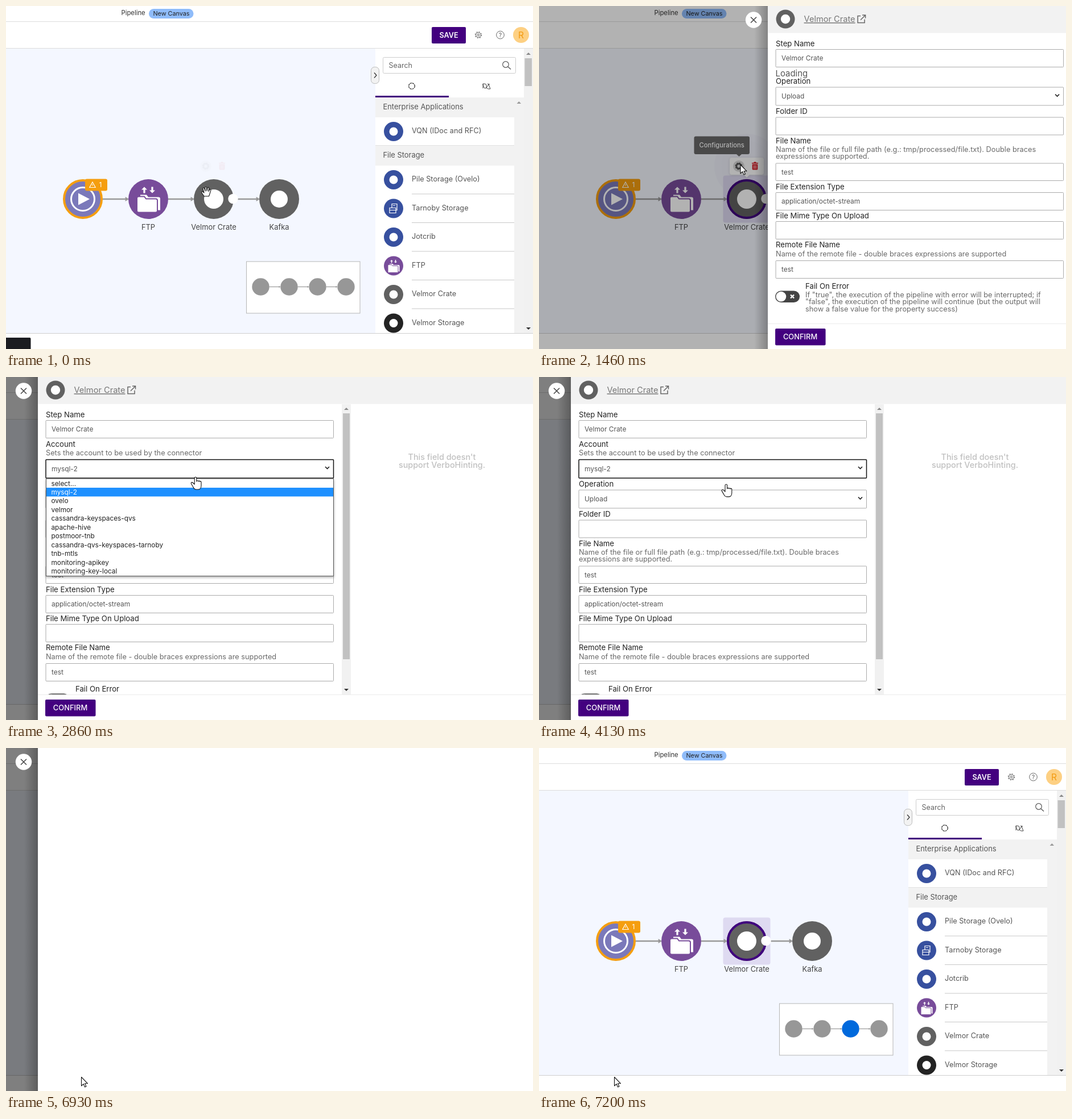
Animation, 926 px wide and 604 px high, one loop 7460 ms. Source, as an HTML page:

```html
<!DOCTYPE html>
<html lang="en">
<head>
<meta charset="utf-8">
<title>Pipeline canvas</title>
<style>
html, body { margin: 0; width: 100%; height: 100%; overflow: hidden; background: #fff; }
svg { display: block; }
text { font-family: Inter, "Open Sans", sans-serif; white-space: pre; }
</style>
</head>
<body>
<svg id="stage" width="926" height="604" viewBox="0 0 926 604"></svg>
<script>
const INDIGO = '#43007f', GREY = '#616161', BLUE = '#37509f', PURPLE = '#784c9a', ORANGE = '#f59e0f';

const text = (x, y, s, size = 13, fill = '#222', more = '') =>
  `<text x="${x}" y="${y}" font-size="${size}" fill="${fill}" ${more}>${s}</text>`;
const mid = (x, y, s, size, fill, more = '') => text(x, y, s, size, fill, `text-anchor="middle" ${more}`);
const rect = (x, y, w, h, fill, more = '') =>
  `<rect x="${x}" y="${y}" width="${w}" height="${h}" fill="${fill}" ${more}/>`;
const dot = (x, y, r, fill, more = '') => `<circle cx="${x}" cy="${y}" r="${r}" fill="${fill}" ${more}/>`;
const path = (d, fill = 'none', more = '') => `<path d="${d}" fill="${fill}" ${more}/>`;
const line = (d, color, w = 1, more = '') => path(d, 'none', `stroke="${color}" stroke-width="${w}" ${more}`);
const group = (id, body, more = '') => `<g id="${id}" ${more}>${body}</g>`;
const at = (x, y, s, body) => `<g transform="translate(${x} ${y}) scale(${s})">${body}</g>`;

const gear = (x, y, r, color, w, tooth) =>
  dot(x, y, r * .7, 'none', `stroke="${color}" stroke-width="${w}"`) +
  dot(x, y, r * .92, 'none', `stroke="${color}" stroke-width="${tooth}" stroke-dasharray="${r * .35} ${r * .3726}"`);

const folder = (x, y, s) => at(x, y, s,
  path('M-14-9h11l3 4h18q3 0 3 3v20h-35z', '#fff') +
  path('M-20-3q0-3 3-3h10l3 4h17q3 0 3 3v18q0 3-3 3h-30q-3 0-3-3z', '#fff', `stroke="${PURPLE}" stroke-width="2"`) +
  path('M-7-23l5 5h-3.4v6h-3.2v-6h-3.4zM7-12l5-5h-3.4v-6h-3.2v6h-3.4z', '#fff'));

const arrowLine = (x1, x2, y, head, w) =>
  line(`M${x1} ${y}H${x2 - 2}`, '#999', w) + path(`M${x2} ${y}l${-head * 1.6} ${-head}v${2 * head}z`, '#999');

function topBar() {
  return line('M0 27.5H926M0 74.5H926', '#dcdcdc') +
    text(202.5, 16, 'Pipeline', 11.3, '#333') +
    rect(251, 5, 78.5, 17, '#8fbcfa', 'rx="8.5"') + mid(290.5, 17, 'New Canvas', 10.8, '#222') +
    rect(748, 37, 60, 29, INDIGO, 'rx="2"') + mid(778, 55.5, 'SAVE', 12.6, '#fff', 'font-weight="600"') +
    gear(830, 51, 6, '#666', 1, 1.2) + dot(830, 51, 1.6, 'none', 'stroke="#666"') +
    dot(868.5, 51, 6.8, '#fff', 'stroke="#666"') + mid(868.5, 54.5, '?', 10, '#555') +
    dot(905, 51, 14, '#fdd083') + mid(905, 56.5, 'R', 15.5, '#f39a10');
}

function sidebar() {
  const items = [
    [220, 'VQN (IDoc and RFC)', BLUE], [305, 'Pile Storage (Ovelo)', BLUE], [355.5, 'Tarnoby Storage', BLUE],
    [406, 'Jotcrib', BLUE], [456.5, 'FTP', PURPLE], [507, 'Velmor Crate', GREY], [557.5, 'Velmor Storage', '#232323']];
  let s = rect(649, 75, 261, 501, '#fff') + rect(910, 75, 16, 501, '#f1f1f1') +
    rect(911.5, 92, 12.5, 49, '#c1c1c1') +
    path('M914 86l4-4 4 4z', '#888') + path('M914 566l4 4 4-4z', '#333') +
    rect(662.5, 90.5, 233, 28, '#fff', 'stroke="#ccc" rx="2"') + text(672.5, 109, 'Search', 12.5, '#666') +
    dot(878, 103, 5.3, 'none', 'stroke="#555" stroke-width="1.2"') + line('M882 107l5 4.5', '#555', 1.3) +
    dot(713, 141, 5.3, 'none', 'stroke="#333" stroke-width="1.3" stroke-dasharray="3.4 .8"') +
    line('M838 137h3q3 0 3 3v4q-2 2-4 0zM844 144l4-6 3 8h-4zM838 145v-8M846 137l4 1', '#444') +
    rect(649, 158, 129, 3, INDIGO) + rect(893, 161, 17, 415, '#f2f2f2') +
    path('M897.5 172l3.8-4 3.8 4z', '#999') +
    rect(649, 161, 244, 35, '#f2f2f2') + text(662.5, 182, 'Enterprise Applications', 12.9, '#555') +
    rect(649, 245.5, 244, 35.5, '#f2f2f2') + line('M649 245.5H893', '#e2e2e2') +
    text(662.5, 267, 'File Storage', 12.9, '#555');
  items.forEach(([y, name, color], i) => {
    s += dot(681, y + 1, 17, color) + text(713, y + 4.3, name, 12.7, '#555');
    if (name === 'FTP') s += folder(681, y + 2, .5);
    else if (i === 2) s += line(`M674 ${y + 9}v-9h11v9zM674 ${y + 4}h11M678 ${y}v-7h9v11h-2M680 ${y - 4}h4`, '#fff', 1.2);
    else s += dot(681, y + 1, 7.5, '#fff');
    if (i && i < 6) s += line(`M713 ${y + 26}H893`, '#c8c8c8');
  });
  return s + rect(641.5, 107.5, 14, 29, '#f2f2f2', 'rx="6" stroke="#bbb"') + line('M647 117.5l4 4.5-4 4.5', '#333', 1.3);
}

function flow() {
  const ring = (x, color) => dot(x, 340, 33, 'none', `stroke="${color}" stroke-width="4"`);
  const name = (x, s) => mid(x, 393.5, s, 12.9, '#444');
  return rect(0, 75, 649, 501, '#f4f7ff') +
    group('ripple', dot(365, 282, 57, '#eef0fa', 'opacity=".6"') + dot(365, 282, 45, '#eef1fb', 'opacity=".6"')) +
    group('selection', rect(323.5, 298.5, 83, 83, '#dedaf1', 'rx="4"')) +
    arrowLine(170, 216, 340, 4, 2.4) + arrowLine(285, 331, 340, 4, 2.4) + arrowLine(400, 446, 340, 4, 2.4) +
    dot(135, 340, 34, '#7b79ba') + ring(135, ORANGE) +
    dot(135, 340, 20.5, 'none', 'stroke="#fff" stroke-width="3"') + path('M127 329.5v21l20-10.5z', '#fff') +
    rect(139, 304.5, 39, 21, ORANGE, 'rx="3"') +
    line('M152 310l5.2 9.5h-10.4zM152 313.5v3', '#fff', 1.1) + mid(166, 319, '1', 12, '#fff') +
    dot(250, 340, 35, PURPLE) + folder(250, 341.5, 1) +
    dot(365, 340, 35, GREY) + group('ring', ring(365, '#40007f')) + dot(365, 340, 17, '#fff') + dot(399, 339.5, 8.7, '#fff') +
    dot(480, 340, 35, GREY) + dot(480, 340, 15, '#fff') +
    name(250, 'FTP') + name(365, 'Velmor Crate') + name(480, 'Kafka') +
    rect(422.5, 450, 199.5, 91, '#fff', 'stroke="#b5b5b5"') +
    [447.5, 497.5, 547.5, 597.5].map((x, i) =>
      (i ? arrowLine(x - 35, x - 15, 494.5, 1.8, 1.2) : '') + dot(x, 494.5, 15.2, '#979797', `id="mini${i}"`)).join('') +
    group('toolbar',
      path('M339 267h52q4 0 4 4v22q0 4-4 4h-21l-5 5-5-5h-21q-4 0-4-4v-22q0-4 4-4z', '#fff', 'style="filter:drop-shadow(0 1px 2px #0002)"') +
      dot(351, 282, 10, '#d9d9d9') + gear(351, 282, 6, '#555', 3, 2) +
      path('M374 276h3l1-1.5h3l1 1.5h3v1.6h-11zM374.7 278.5h9.6v8.5q0 1.5-1.5 1.5h-6.6q-1.5 0-1.5-1.5z', '#d8222c') +
      line('M377.5 280.5v6M379.5 280.5v6M381.5 280.5v6', '#fff', .7)) +
    group('tip', rect(272.5, 229.5, 97.5, 31.5, '#686868', 'rx="3"') + path('M347 261h9l-4.5 4z', '#686868') +
      mid(321.2, 249, 'Configurations', 11.2, '#fff', 'font-weight="500"'));
}

// Panel coordinates: x is measured from the panel's left edge.
const fields = [];
function field(y, value = '', select = false, h = 31) {
  fields.push([y, h]);
  return rect(14, y + .5, 505.5, h, '#fff', 'rx="1" class="field"') + text(24, y + h / 2 + 4.8, value, 11.9, '#555') +
    (select ? line(`M505 ${y + 13}l3.5 3.5 3.5-3.5`, '#222', 1.7) : '');
}
const label = (y, s, x = 14) => text(x, y, s, 13.15);
const hint = (y, s, x = 14) => text(x, y, s, 12.75, '#6a6a6a');

function menu(id, y, options) {
  const step = 15.45, h = options.length * step + 1.5;
  return group(id, rect(14.5, y, 505, h, '#fff', 'stroke="#555" style="filter:drop-shadow(0 2px 2px #0005)"') +
    rect(15, y + step + .5, 504, step, '#1e90ff') +
    options.map((s, i) => text(23.5, y + 12.5 + i * step, s, 11.8, i === 1 ? '#fff' : '#222')).join(''));
}

function panel() {
  const title = 'Velmor Crate';
  const form = label(70.7, 'Step Name') + field(76, title) +
    group('loading', text(13.5, 124, 'Loading', 14.9, '#555')) +
    group('account', label(122.5, 'Account') + hint(137.5, 'Sets the account to be used by the connector') +
      field(145, 'mysql-2', true, 32.5)) +
    group('rest',
      label(136.5, 'Operation') + field(142.5, 'Upload', true, 32) +
      label(189.5, 'Folder ID') + field(195.5) +
      label(241.5, 'File Name') +
      hint(256.5, 'Name of the file or full file path (e.g.: tmp/processed/file.txt). Double braces') +
      hint(269, 'expressions are supported.') + field(276.5, 'test', false, 30.5) +
      label(322.5, 'File Extension Type') + field(328, 'application/octet-stream') +
      label(373.5, 'File Mime Type On Upload') + field(379) +
      label(424.5, 'Remote File Name') + hint(441, 'Name of the remote file - double braces expressions are supported') +
      field(448, 'test') +
      rect(13, 501.5, 43, 20.5, '#444', 'rx="10.2"') + dot(23.3, 511.7, 8.9, '#fff') +
      line('M40 508.5l6 6m0-6l-6 6', '#fff', 2.4) +
      label(498, 'Fail On Error', 66) +
      hint(513, 'If "true", the execution of the pipeline with error will be interrupted; if', 66) +
      hint(525, '"false", the execution of the pipeline will continue (but the output will', 66) +
      hint(537.5, 'show a false value for the property success)', 66));
  return rect(-24, 0, 24, 604, 'url(#shade)') + rect(0, 0, 870, 604, '#fff') +
    dot(-25, 24.5, 14.2, '#fff') + line('M-30 19.5l10 10m0-10l-10 10', '#444', 1.5) +
    group('content',
      rect(0, 0, 870, 47.5, '#f2f2f2') + dot(31, 23, 16.5, GREY) + dot(31, 23, 8.2, '#fff') +
      text(63.5, 28, title, 14.6, '#777', 'text-decoration="underline"') +
      line('M163 17.5h-5v12h12v-6M166 16h5.5v5.5M171 16.5l-8 8', '#666', 1.5) +
      `<g clip-path="url(#body)">${form}</g>` +
      rect(534, 48, 16, 512, '#f1f1f1') + rect(536, 64, 12, 433, '#c1c1c1') +
      path('M538 58l4-4 4 4z', '#888') + path('M538 549l4 4 4-4z', '#333') +
      mid(710, 146, 'This field doesn\'t', 14.4, '#c0c0c0', 'font-weight="500"') +
      mid(710, 159.5, 'support VerboHinting.', 14.4, '#c0c0c0', 'font-weight="500"') +
      rect(0, 559, 870, 1.5, '#ececec') + rect(0, 560, 870, 44, '#fff') +
      rect(13, 568, 88.5, 29.5, INDIGO, 'rx="2"') + mid(57, 587, 'CONFIRM', 12.9, '#fff', 'font-weight="500"') +
      menu('accounts', 179, ['select...', 'mysql-2', 'ovelo', 'velmor', 'cassandra-keyspaces-qvs', 'apache-hive',
        'postmoor-tnb', 'cassandra-qvs-keyspaces-tarnoby', 'tnb-mtls', 'monitoring-apikey', 'monitoring-key-local']) +
      menu('operations', 233, ['select...', 'Upload', 'Download', 'List']));
}

const cursor = (id, d) => group(id, path(d, '#fff', 'stroke="#111" stroke-width="1.1" stroke-linejoin="round"'));
const cursors =
  cursor('arrow', 'M0 0v15.5l3.6-3.3 2.4 5.4 2.4-1-2.4-5.3h5z') +
  cursor('hand', 'M-1.8 2a1.8 1.8 0 013.6 0v6c0-2 3.2-2 3.2 0 .2-1.6 2.7-1.6 2.7 .3 .4-1.3 2.3-1 2.3 .7v6c0 4-2 7-5 7h-4c-3 0-4-2-5-4l-3.5-6c-1-2 1-3.4 2.6-2l3.1 3z') +
  cursor('grab', 'M-4 8l-4-6c-1-2 1-3 2.5-1.5l1.5 1.5-2-7c-.5-2 2-2.5 2.6-.6l1.6 4.6-.4-6c0-2 2.5-2 2.7 0l.5 5.6 1-5c.4-2 2.8-1.5 2.5 .4l-.5 5.6 1.5-3c1-1.6 3-.6 2.4 1l-2 6.4-1.4 4z');

const $ = id => document.getElementById(id);
$('stage').innerHTML =
  `<defs><linearGradient id="shade"><stop stop-opacity="0"/><stop offset="1" stop-opacity=".26"/></linearGradient>
   <clipPath id="body"><rect y="48" width="534" height="512"/></clipPath></defs>` +
  rect(0, 0, 926, 604, '#fff') + topBar() + flow() + sidebar() + line('M0 576.5H926', '#cfcfcf') +
  group('badge', rect(-4, 584, 47.5, 24, '#1b1c20', 'rx="2"')) +
  rect(0, 0, 926, 604, '#000', 'id="dim"') + group('panel', panel()) + group('cursor', cursors);

const boxes = [...document.querySelectorAll('.field')];
const LOOP = 7460, STEP = 200 / 3, SHIFT = 56;
const clamp = v => Math.max(0, Math.min(1, v));
const show = (id, on) => $(id).style.display = on ? '' : 'none';
const easeOut = u => 1 - (1 - u) ** 2;
const easeBoth = u => u * u * (3 - 2 * u);

// Time, x and y of the pointer; it rests between equal points.
const route = [[0, 352, 327], [330, 352, 327], [800, 386, 312], [866, 354, 279.5], [2070, 354, 279.5],
  [2800, 333, 176], [3870, 333, 176], [4533, 321, 213], [5400, 321, 213], [6267, 132.5, 579.5], [LOOP, 132.5, 579.5]];

function pointer(t) {
  const i = Math.max(1, route.findIndex(p => p[0] >= t));
  const [t0, x0, y0] = route[i - 1], [t1, x1, y1] = route[i];
  const u = easeBoth(clamp((t - t0) / (t1 - t0)));
  return [x0 + (x1 - x0) * u, y0 + (y1 - y0) * u];
}

function draw(ms) {
  // The screen is refreshed 15 times a second.
  const t = Math.floor((ms + 7) / STEP) * STEP;
  const within = (a, b) => t > a && t < b;
  const selected = t > 330;
  show('badge', t < 60);
  show('selection', selected);
  show('ring', selected);
  $('mini2').setAttribute('fill', selected ? '#0069dc' : '#979797');
  show('toolbar', t < 1700);
  $('toolbar').style.opacity = .05 + .95 * clamp((t - 60) / 270);
  show('ripple', within(700, 1700));
  show('tip', within(720, 1700));

  const opening = t < 1395 ? 0 : clamp((t - 1349.6) / 317), closing = clamp((t - 6934) / 266);
  const slide = easeOut(opening) - easeOut(closing);
  show('panel', slide > 0);
  $('dim').setAttribute('opacity', .5 * slide);
  $('panel').setAttribute('transform', `translate(${926 - 870 * slide} 0)`);

  const loaded = t > 1590;
  show('loading', !loaded);
  show('account', loaded);
  $('rest').setAttribute('transform', `translate(0 ${loaded ? SHIFT : 0})`);
  show('content', t < 6790);
  show('accounts', within(2860, 3660));
  show('operations', within(4595, 5260));

  const [x, y] = pointer(t);
  const focus = t < 1660 ? -1 : t < 2795 ? 0 : t < 4530 ? 1 : 2;
  boxes.forEach((box, i) => {
    const top = fields[i][0] + (i > 1 ? SHIFT : 0);
    const hover = within(5460, 6200) && y > top && y < top + fields[i][1];
    box.setAttribute('stroke', i === focus || hover ? '#111' : '#aaa');
    box.setAttribute('stroke-width', i === focus ? 1.5 : 1);
  });

  const kind = t < 860 ? 'grab' : within(2600, 5600) || within(6100, 6790) ? 'hand' : 'arrow';
  for (const id of ['arrow', 'hand', 'grab']) show(id, id === kind);
  $('cursor').setAttribute('transform', `translate(${x} ${y})`);
}

const start = performance.now();
function tick() {
  draw((performance.now() - start) % LOOP);
  requestAnimationFrame(tick);
}
tick();
</script>
</body>
</html>
```
